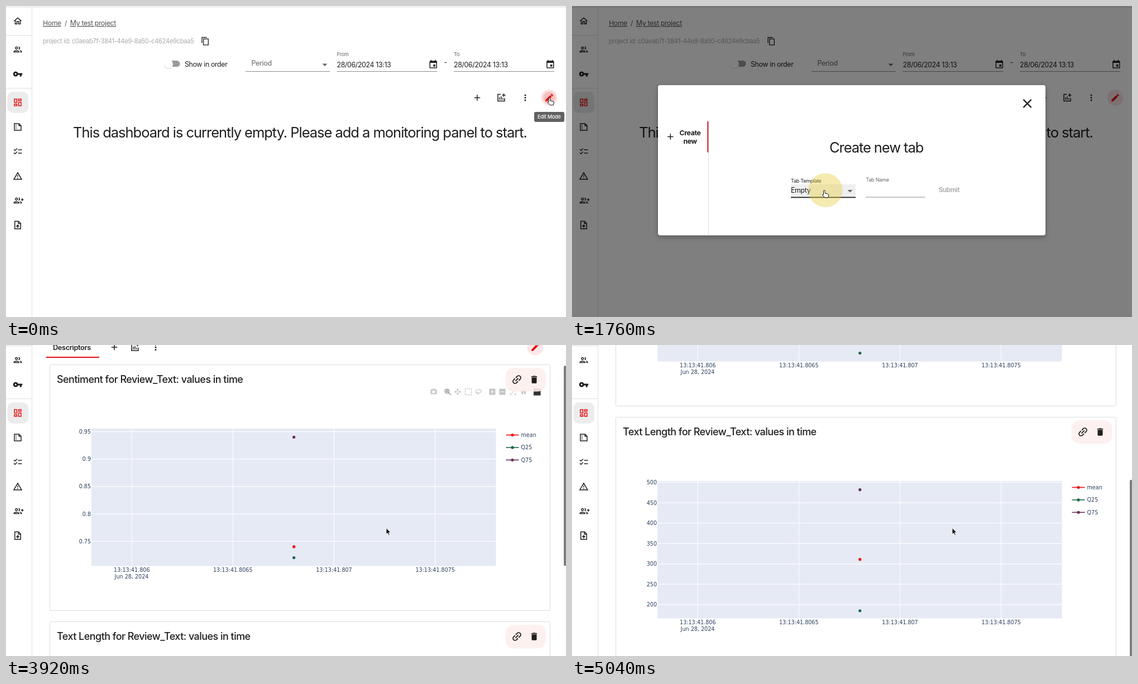
Recreate the animation shown at these times as an HTML page. Size 1003 by 558 pixels, loop 5.2 s.

```html
<!DOCTYPE html>
<html lang="en">
<head>
<meta charset="utf-8">
<title>Dashboard tab demo</title>
<style>
  html, body { margin: 0; width: 100%; height: 100%; overflow: hidden; background: #fff; }
  svg { display: block; width: 100%; height: 100%; }
  text { font-family: Inter, "Open Sans", sans-serif; font-optical-sizing: none; letter-spacing: -.03em; white-space: pre; }
  .large { letter-spacing: -.042em; }
  .plot { font-family: "DejaVu Sans", sans-serif; letter-spacing: 0; }
  .dialog, .menu { filter: drop-shadow(0 3px 5px rgba(0, 0, 0, .3)); }
</style>
</head>
<body>
<svg id="stage" viewBox="0 0 1003 558"></svg>
<script>
const LOOP = 5200, STEP = 80;
const INK = '#1f1f1f', RED = '#e60f0f', NAVY = '#2a3f5f';

// Icons on a 24 unit grid: filled shapes, then outlines.
const SOLID = {
  home: 'M12 5.7l5 4.5V18h-2v-6H9v6H7v-7.8l5-4.5M12 3L2 12h3v8h6v-6h2v6h6v-8h3z',
  key: 'M12.65 10C11.83 7.67 9.61 6 7 6c-3.31 0-6 2.69-6 6s2.69 6 6 6c2.61 0 4.83-1.67 5.65-4H17v4h4v-4h2v-4zM7 14c-1.1 0-2-.9-2-2s.9-2 2-2 2 .9 2 2-.9 2-2 2z',
  edit: 'M3 17.25V21h3.75L17.8 9.94l-3.75-3.75zM20.7 7.04q.6-.7 0-1.41l-2.34-2.34q-.7-.6-1.41 0l-1.83 1.83 3.75 3.75z',
  trash: 'M6 19c0 1.1.9 2 2 2h8c1.1 0 2-.9 2-2V7H6zM19 4h-3.5l-1-1h-5l-1 1H5v2h14z',
  more: 'M10 6a2 2 0 1 0 4 0a2 2 0 1 0-4 0M10 12a2 2 0 1 0 4 0a2 2 0 1 0-4 0M10 18a2 2 0 1 0 4 0a2 2 0 1 0-4 0',
  calendar: 'M17 12h-5v5h5zM16 1v2H8V1H6v2H5q-2 0-2 2v14q0 2 2 2h14q2 0 2-2V5q0-2-2-2h-1V1zm3 18H5V8h14z',
  camera: 'M9 2L7 4H4q-2 0-2 2v12q0 2 2 2h16q2 0 2-2V6q0-2-2-2h-3l-2-2zM12 17a5 5 0 1 1 0-10a5 5 0 1 1 0 10z',
  pan: 'M10 9h4V6h3l-5-5-5 5h3zm-1 1H6V7l-5 5 5 5v-3h3zm14 2l-5-5v3h-3v4h3v3zm-9 3h-4v3H7l5 5 5-5h-3z',
  zoomIn: 'M2 2h20v20H2zM11 6v5H6v2h5v5h2v-5h5v-2h-5V6z',
  zoomOut: 'M2 2h20v20H2zM6 11v2h12v-2z',
  house: 'M10 20v-6h4v6h5v-8h3L12 3 2 12h3v8z',
  down: 'M6 10h12l-6 6z'
};
const PEOPLE = 'M6.5 8.5a2.5 2.5 0 1 0 5 0a2.5 2.5 0 1 0-5 0M3 18v-.8C3 15.6 7 14.7 9 14.7s6 .9 6 2.5v.8zM14 6a2.5 2.5 0 0 1 0 5M17 14.5c2 .4 4 1.4 4 2.7v.8h-3';
const LINE = {
  people: PEOPLE,
  invite: PEOPLE + 'M23 7v6M20 10h6',
  grid: 'M4 4h6v8H4zM14 4h6v4h-6zM14 12h6v8h-6zM4 16h6v4H4z',
  report: 'M4 4h11l5 5v11H4zM15 4v5h5M7 8h2M7 12h2M7 16h2',
  checks: 'M13 8h9M13 16h9M2.7 7l2.8 2.7 5-5M2.7 15l2.8 2.7 5-5',
  warning: 'M12 4l9.3 16H2.7zM12 10v4M12 16v2',
  upload: 'M5 3h9l5 5v13H5zM13.5 3v5.5H19M12 19v-6M8.5 15.7l3.5-3.5 3.5 3.5',
  copy: 'M3 17V2h13M7 6h13v16H7z',
  plus: 'M12 5v14M5 12h14',
  chart: 'M11 4H4v16h16v-7M18 2v8M14 6h8M8 11v6M12 9v8M16 13v4',
  close: 'M5.7 5.7l12.6 12.6M18.3 5.7L5.7 18.3',
  link: 'M11 8H7a4 4 0 0 0 0 8h4M8 12h8M13 8h4a4 4 0 0 1 0 8h-4',
  zoom: 'M4 10a6 6 0 1 0 12 0a6 6 0 1 0-12 0M14.5 14.5l7 7M7 10h6M10 7v6',
  lasso: 'M7 17C1 14 2 5 12 4s13 9 3 12q-7 1-8-1t3 0-2 7',
  scale: 'M3 9V3h6M15 3h6v6M21 15v6h-6M9 21H3v-6M8 16l8-8'
};

const attrs = o => Object.entries(o).map(([k, v]) => ` ${k}="${v}"`).join('');
const rect = (x, y, width, height, fill, more = {}) => `<rect${attrs({ x, y, width, height, fill, ...more })}/>`;
const circle = (cx, cy, r, fill, more = {}) => `<circle${attrs({ cx, cy, r, fill, ...more })}/>`;
const path = (d, more) => `<path${attrs({ d, ...more })}/>`;
const group = (body, more) => `<g${attrs(more)}>${body}</g>`;
const text = (x, y, str, size, more = {}) =>
  `<text${attrs({ x, y, 'font-size': size, fill: INK, ...more })}>${str}</text>`;
const plotText = (x, y, str, anchor = 'middle') =>
  text(x, y, str, 9.6, { class: 'plot', fill: NAVY, 'text-anchor': anchor });

function icon(name, x, y, color = INK, size = 18, turn = 0) {
  const transform = `translate(${x} ${y}) rotate(${turn}) scale(${size / 24}) translate(-12 -12)`;
  return SOLID[name]
    ? path(SOLID[name], { transform, fill: color, 'fill-rule': 'evenodd' })
    : path(LINE[name], { transform, fill: 'none', stroke: color, 'stroke-width': 2 });
}

// Value at time t from [time, value] points.
function track(points, t, ease = k => k) {
  const next = points.findIndex(p => p[0] > t);
  if (next === 0) return points[0][1];
  if (next < 0) return points[points.length - 1][1];
  const [[t0, a], [t1, b]] = points.slice(next - 1, next + 1);
  return a + (b - a) * ease((t - t0) / (t1 - t0));
}
const smooth = k => k * k * (3 - 2 * k);

const scrollPath = [[3680, 0], [3760, 12], [3840, 80], [3920, 151], [4000, 180], [4080, 190], [4160, 190],
  [4240, 225], [4320, 345], [4400, 442], [4480, 484], [4560, 503], [4640, 512], [4720, 516], [5040, 518]];
const cursorX = [[400, 973.5], [640, 931.5], [1440, 931.5], [1760, 452], [2080, 452], [2240, 440], [2480, 440], [2640, 648], [2880, 681]];
const cursorY = [[400, 165], [640, 166], [1440, 166], [1760, 331], [2080, 331], [2240, 367], [2480, 367], [2640, 365], [2880, 328.5]];
const dialogFade = [[960, 0], [1120, .75], [1200, 1], [3120, 1], [3360, 0]];

const sidebar = rect(0, 0, 46, 700, '#fff') + rect(46, 0, 1, 700, '#e0e0e0')
  + rect(0, 1, 46, 1.5, '#e6e6e6') + rect(0, 52, 46, 1, '#e0e0e0') + rect(0, 147, 46, 1, '#e0e0e0')
  + rect(2.5, 154, 37.5, 38, '#ececec', { rx: 10 })
  + [['home', 27], ['people', 78], ['key', 122], ['grid', 173, RED], ['report', 217], ['checks', 261],
     ['warning', 305], ['invite', 349], ['upload', 393]].map(([n, y, c]) => icon(n, 21, y, c)).join('');

const dateField = (x, label) => text(x, 90, label, 9.2, { fill: '#666' })
  + text(x, 109.5, '28/06/2024 13:13', 12.4) + rect(x, 117, 180, 1, '#8c8c8c') + icon('calendar', x + 172.8, 105);

const link = { 'text-decoration': 'underline', fill: '#555' };
const header = rect(46, 1, 957, 1.5, '#e6e6e6')
  + text(66, 35, 'Home', 12.2, link) + text(105, 35, '/', 12, { fill: '#555' }) + text(114.8, 35, 'My test project', 12.4, link)
  + text(66, 67, 'project id: c0aeab7f-3841-44e9-8a50-c4624e9cbaa5', 11.2, { fill: '#aaa' }) + icon('copy', 357, 63.2, INK, 16)
  + rect(288, 98, 23.5, 11, '#999', { rx: 5.5 }) + circle(291, 104.7, 8.2, '#ddd') + circle(291, 103.8, 7.7, '#fff')
  + text(320, 108.5, 'Show in order', 12.4)
  + text(439.5, 107, 'Period', 12.6, { fill: '#666' }) + icon('down', 571, 105, '#666') + rect(429, 117, 151, 1, '#8c8c8c')
  + dateField(592.5, 'From') + text(784.5, 105, '-', 12.4) + dateField(802, 'To');

const emptyDashboard = icon('plus', 844, 164.5) + icon('chart', 887, 164.5) + icon('more', 930, 164.5)
  + text(120, 236.3, 'This dashboard is currently empty. Please add a monitoring panel to start.', 25.6, { class: 'large' });

const tabBar = text(84, 160, 'Descriptors', 12.8, { 'font-weight': 600 }) + rect(72, 172, 95, 2, RED)
  + icon('plus', 194, 155) + icon('chart', 231, 155) + icon('more', 268, 155)
  + circle(948, 155, 14.5, '#fde7e7') + icon('edit', 948, 155, RED);

const modebar = [['camera', 766], ['pan', 809], ['lasso', 846], ['zoomIn', 871], ['zoomOut', 889], ['scale', 908], ['house', 927]]
  .map(([n, x]) => icon(n, x, 235, '#c4c4c4', 13)).join('') + icon('zoom', 791, 235, '#777', 14)
  + rect(822.5, 229.5, 11, 11, 'none', { stroke: '#c0c0c0', 'stroke-width': 1.4, 'stroke-dasharray': '2 1.4' })
  + rect(945, 229, 12.5, 12.5, '#333');

// values: [mean, Q25, Q75]; drawn at the place of the first panel.
function panel(title, ticks, yOf, values, extras = '') {
  const colors = ['#f40d12', '#1c6843', '#6b2f59'];
  const xTicks = [[225.3, '13:13:41.806'], [406.3, '13:13:41.8065'], [587.5, '13:13:41.807'], [768.7, '13:13:41.8075']];
  return rect(78.5, 186.5, 896, 441, '#fff', { stroke: '#dcdcdc', rx: 2 }) + text(91, 218.5, title, 18, { 'font-weight': 500 })
    + extras + rect(894.5, 192, 73, 42.5, '#fdf0ee', { rx: 15, opacity: .9 })
    + icon('link', 915, 213, INK, 22, -45) + icon('trash', 946, 213, INK, 18)
    + rect(153, 301, 724.5, 246.5, '#e5eaf5')
    + xTicks.map(([x, s]) => rect(x - .5, 301, 1, 246.5, '#fff') + plotText(x, 558, s)).join('')
    + plotText(225, 570, 'Jun 28, 2024')
    + ticks.map(v => rect(153, yOf(v) - .6, 724.5, 1.2, '#fff') + plotText(152, yOf(v) + 3.6, v, 'end')).join('')
    + values.map((v, i) => circle(515.7, yOf(v), 2.6, colors[i])).join('')
    + ['mean', 'Q25', 'Q75'].map((s, i) => {
        const y = 312.5 + 22.4 * i;
        return rect(895.5, y - .8, 23, 1.6, colors[i]) + circle(907, y, 2.6, colors[i]) + plotText(922.5, y + 3.5, s, 'start');
      }).join('');
}

const panels = panel('Sentiment for Review_Text: values in time', [.95, .9, .85, .8, .75],
    v => 306.5 + (.95 - v) * 983, [.74, .72, .94], modebar)
  + group(panel('Text Length for Review_Text: values in time', [500, 450, 400, 350, 300, 250, 200],
    v => 303.5 + (500 - v) * .731, [311, 185, 482]), { transform: 'translate(0 461)' });

function tooltip(x, y, width, label, opacity) {
  return group(rect(x, y, width, 18, '#616161', { rx: 3 })
    + text(x + 6, y + 12.4, label, 9.2, { fill: '#fff', 'font-weight': 500 }), { opacity });
}

function dialog(t) {
  const filled = t >= 2320, templateFocus = t >= 1760, nameFocus = !templateFocus;
  const shrink = track([[1120, 0], [1280, 1], [1760, 1], [1920, 0], [2320, 0], [2480, 1]], t);
  const grow = track([[1120, 1], [1200, 0]], t);
  const focusHalf = track([[1040, 0], [1120, 46.5], [1200, 53]], t);
  const menu = track([[1760, 0], [1920, 1], [2320, 1], [2480, 0]], t);
  const bold = { 'font-weight': 700, 'text-anchor': 'middle' };
  return rect(154, 142, 694, 269.5, '#fff', { rx: 4, class: 'dialog' })
    + icon('close', 815.5, 175, INK, 27)
    + icon('plus', 176.3, 234.5) + text(211.5, 231.5, 'Create', 12.3, bold) + text(211.5, 247, 'new', 12.3, bold)
    + rect(244, 207, 1, 204.5, '#dcdcdc') + rect(242.3, 207, 2, 55.5, '#c81e28')
    + text(461, 263.3, 'Create new tab', 25.5, { class: 'large' })
    + (templateFocus ? rect(392, 320, 116, 23, '#efefef') : '')
    + text(392, 316.5 + 3 * grow, 'Tab Template', 9.1 + .5 * grow, { fill: templateFocus ? INK : '#666' })
    + text(392, 335.3, filled ? 'Descriptors' : 'Empty', 12.4)
    + icon('down', 498, 331.5, '#666') + rect(392, 342.5, 116, templateFocus ? 1.8 : 1, templateFocus ? INK : '#8c8c8c')
    + text(526.3, 335.3 - 20 * shrink, 'Tab Name', 12 - 2.9 * shrink, { fill: nameFocus ? '#444' : '#666' })
    + (filled ? text(526.3, 335.3, 'Descriptors', 12.4) : '') + rect(526, 342.5, 106.5, 1, '#8c8c8c')
    + (nameFocus ? rect(526, 324, 1, 14, INK) + rect(579.3 - focusHalf, 341.8, 2 * focusHalf, 1.8, INK) : '')
    + text(657, 333.7, 'Submit', 11.4, { 'font-weight': 700, fill: filled ? INK : '#b0b0b0' })
    + (menu ? group(rect(392, 307, 116, 86, '#fff', { rx: 4 }) + rect(392, t < 2160 ? 314 : 350, 116, 36, '#eee')
        + text(404, 336, 'Empty', 12.4) + text(404, 372, 'Descriptors', 12.4), { opacity: menu, class: 'menu' }) : '');
}

function cursor(t) {
  const x = track(cursorX, t, smooth), y = track(cursorY, t, smooth);
  const ring = Math.max(...[960, 1760, 2320, 2960].map(c => track([[c - 80, 0], [c, 1], [c + 160, 1], [c + 320, 0]], t)));
  const hand = t < 1520 || (t >= 1760 && t < 2480) || (t >= 2800 && t < 3200);
  const shape = hand
    ? path('M-1.5 1.2a1.4 1.4 0 0 1 2.8 0V5l5 1.2q1.6.5 1.4 2.2l-.8 4.4H1.2L-3.4 8.4q-.3-1.5 1.9-1z', { fill: '#fff', stroke: '#111' })
    : path('M0 0v11l2.6-2.3 1.8 4 1.9-.8-1.8-4H8z', { fill: '#111', stroke: '#fff', 'stroke-width': .8 });
  return circle(x + 2, y - .5, 30.5, '#e6cd3c', { opacity: .4 * ring })
    + group(shape, { transform: `translate(${x} ${y})` });
}

function scene(t) {
  const scroll = track(scrollPath, t), fade = track(dialogFade, t), created = t >= 3200;
  const pulse = track([[0, 1], [240, 0]], t), overDots = t >= 640 && t < 1520;
  const toolbar = emptyDashboard
    + circle(973, 164.5, 14.5, '#fde3e3') + circle(973, 164.5, 11, '#f7aaaa', { opacity: .6 * pulse }) + icon('edit', 973, 164.5, RED)
    + (overDots ? circle(930, 164.5, 13.5, '#c84632', { opacity: t < 960 ? .08 : .2 }) : '');
  return group(header + (created ? tabBar + panels : toolbar), { transform: `translate(0 ${-scroll})` })
    + group(sidebar, { transform: `translate(0 ${-Math.min(scroll, 51)})` })
    + (t >= 3760 ? rect(999, scroll * .558 - 47, 6, 359, '#7d7d7d', { rx: 2 }) : '')
    + (fade ? rect(0, 0, 1003, 558, '#000', { opacity: fade / 2 }) + group(dialog(t), { opacity: fade }) : '')
    + tooltip(946, 190, 54, 'Edit Mode', track([[400, 1], [560, 0]], t))
    + tooltip(906, 191, 49, 'Edit tabs', track([[560, 0], [640, 1], [1440, 1], [1600, 0]], t))
    + cursor(t);
}

const stage = document.getElementById('stage');
const start = performance.now();
let shown = -1;
function draw() {
  const t = Math.floor((performance.now() - start) % LOOP / STEP) * STEP;
  if (t !== shown) stage.innerHTML = scene(shown = t);
  requestAnimationFrame(draw);
}
draw();
</script>
</body>
</html>
```
